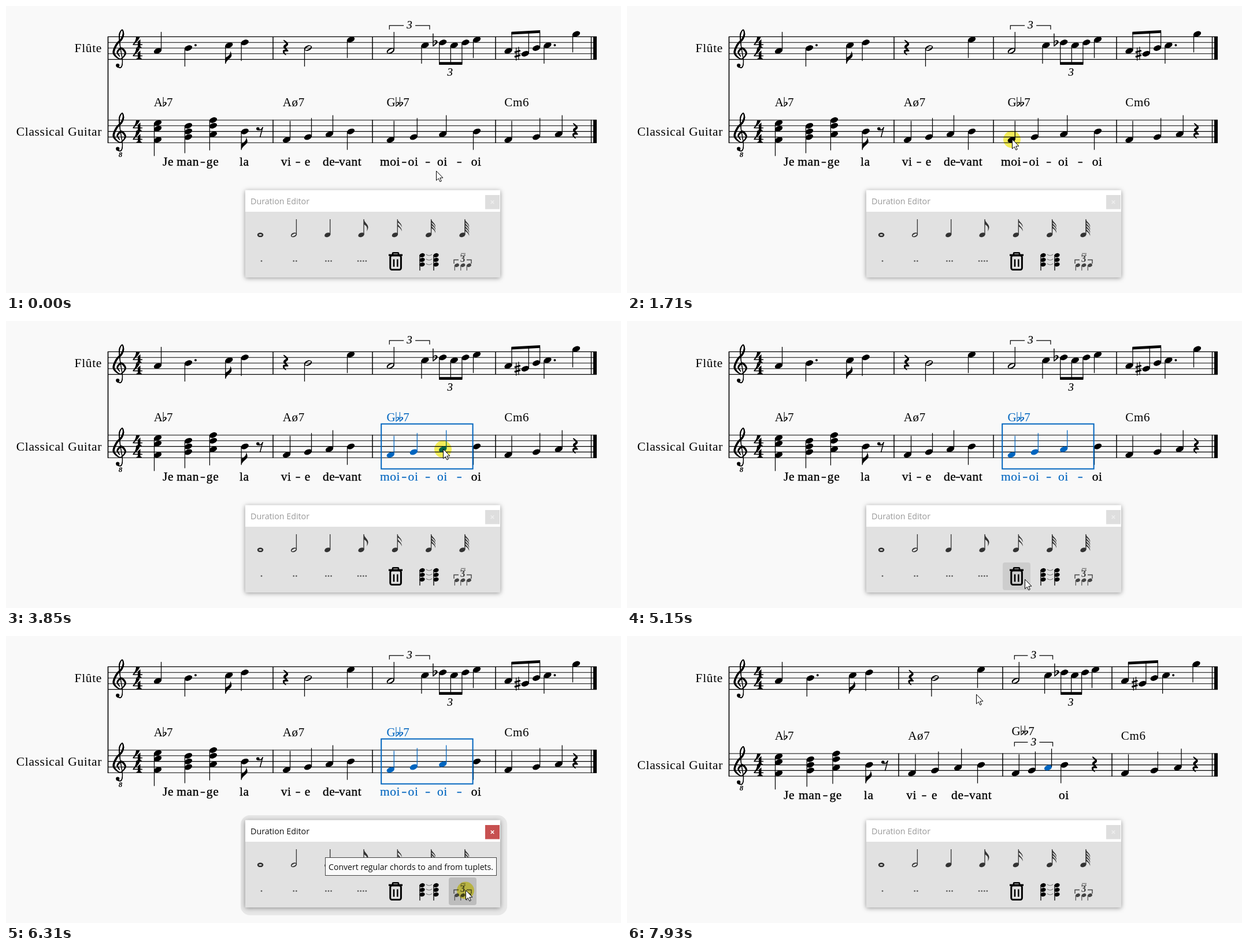
Animation of 1064x498 px, one loop 8 s. Source, as an HTML page with a canvas:

```html
<!DOCTYPE html>
<html lang="en">
<head>
<meta charset="utf-8">
<title>Duration Editor</title>
<style>
html, body { margin: 0; width: 100%; height: 100%; overflow: hidden; background: #f9f9f9; }
canvas { display: block; }
</style>
</head>
<body>
<canvas id="stage" width="1064" height="498"></canvas>
<script>
const ctx = document.getElementById('stage').getContext('2d');
const LOOP = 8000, SP = 9.8, BEAT = 12, INK = '#000', BLUE = '#0065bf', PAPER = '#f9f9f9';
const SERIF = '"Liberation Serif", serif', SANS = '"Open Sans", sans-serif';
const FLUTE_TOP = 53.4;

// Pitches high to low, length in twelfths of a beat, z = rest, ( ) = beam
const FLUTE = 'A12 B18 c6 d12|z12 B24 e12|A16 c8 (_d4 c4 d4) e12|(A6 ^G6 B6) c18 g12';
const GUITAR = 'Fce12 GBd12 Adf12 B6 z6|F12 G12 A12 B12|F12 G12 A12 B12|F12 G12 A12 z12';
const CONVERTED = GUITAR.replace('B12|F12 G12 A12 B12', 'B12|F8 G8 A8 B12 z12');
const VERSE = 'Je man- ge la|vi- e de- vant|';
const CHORDS = ['Ab7', 'Aø7', 'Gbb7', 'Cm6'];

function parse(source) {
  return source.split('|').map(bar => {
    let at = 0, beamed = false;
    return bar.split(' ').map(token => {
      const [, open, sign, keys, len, close] = token.match(/(\(?)([_^]?)([A-Ga-gz]+)(\d+)(\)?)/);
      beamed = beamed || !!open;
      const n = { at, sign, beamed, len: +len, rest: keys === 'z', steps: [...keys].map(k => 'gfedcBAGF'.indexOf(k) - 1) };
      at += n.len;
      if (close) beamed = false;
      return n;
    });
  });
}

// spans: x of the first and last column in each bar; wider beats grow with a power of their length
function layout(top, bars, spans, guitarSource, verse) {
  const flute = parse(FLUTE), guitar = parse(guitarSource);
  spans.forEach(([first, last], b) => {
    const notes = [...flute[b], ...guitar[b]];
    const times = [...new Set(notes.map(n => n.at))].sort((p, q) => p - q);
    const pad = b % 3 ? 0 : 10;
    const weight = i => ((times[i] - times[i - 1]) / BEAT) ** 0.65;
    const total = times.reduce((sum, _, i) => i ? sum + weight(i) : 0, 0);
    let x = first;
    times.forEach((at, i) => {
      if (i) x += weight(i) * (last - first - pad) / total + (i === 1 ? pad : 0);
      notes.filter(n => n.at === at).forEach(n => n.x = x);
    });
  });
  return { top, bars, flute, guitar, verse: verse.split('|').map(v => v.split(' ')) };
}
const BEFORE = layout(198, [462, 634, 847], [[262.5, 440.5], [485.5, 596.5], [665.3, 814.5], [869, 986.5]],
  GUITAR, VERSE + 'moi- oi- oi- oi');
const AFTER = layout(204, [470, 650, 839], [[262.5, 447.5], [493, 612.5], [672.3, 810.5], [861.5, 985]],
  CONVERTED, VERSE + '_ _ _ oi');

// Pointer moves: start, end, target x, target y
const MOVES = [
  [330, 1090, 672, 237], [1160, 1370, 666, 231], [2030, 2560, 769, 223], [2636, 2790, 756, 222],
  [4520, 5150, 688, 448], [5220, 5290, 779, 441], [5360, 5500, 810, 441], [5840, 6110, 795, 441],
  [7180, 7520, 668, 163], [7790, 7930, 604, 101]
];
const CLICKS = [[1710, 1830], [3850, 3920], [6310, 6450]];
const within = (t, a, b) => t >= a && t < b;

function pointer(t) {
  let x = 744, y = 286;
  for (const [a, b, tx, ty] of MOVES) {
    if (t < a) break;
    const gaps = Math.round((b - a) / 74);
    const p = Math.min(1, (Math.floor((t - a) / (b - a) * gaps + 1e-6) + 1) / (gaps + 1));
    const ease = p * p * (3 - 2 * p);
    x += (tx - x) * ease;
    y += (ty - y) * ease;
  }
  return { x: Math.round(x), y: Math.round(y) };
}

// ---- drawing helpers ----
function ink(color) { ctx.fillStyle = ctx.strokeStyle = color; }
function line(x1, y1, x2, y2, w) {
  ctx.lineWidth = w;
  ctx.beginPath(); ctx.moveTo(x1, y1); ctx.lineTo(x2, y2); ctx.stroke();
}
function dot(x, y, r) { ctx.beginPath(); ctx.arc(x, y, r, 0, 7); ctx.fill(); }
function oval(x, y, rx, ry, tilt) { ctx.beginPath(); ctx.ellipse(x, y, rx, ry, tilt, 0, 7); ctx.fill(); }
function box(x, y, w, h, r) { ctx.beginPath(); ctx.roundRect(x, y, w, h, r); }
function path(x, y, d, scale = 1) {
  ctx.save(); ctx.translate(x, y); ctx.scale(scale, scale); ctx.fill(new Path2D(d)); ctx.restore();
}
function text(s, x, y, font, o = {}) {
  ctx.font = font;
  ctx.textAlign = o.align || 'left';
  ctx.letterSpacing = (o.gap || 0) + 'px';
  ctx.fillText(s, x, y);
  if (o.bold) { ctx.lineWidth = o.bold; ctx.strokeText(s, x, y); }
  return ctx.measureText(s).width;
}

// Smooth brush stroke through [x, y, width] points
function brush(ox, oy, pts) {
  ctx.lineCap = 'round';
  const at = i => pts[Math.max(0, Math.min(pts.length - 1, i))];
  let last = pts[0];
  for (let s = 1; s <= (pts.length - 1) * 10; s++) {
    const i = Math.floor((s - 1) / 10), u = s / 10 - i;
    const p = [0, 1, 2].map(j => {
      const a = at(i - 1)[j], b = at(i)[j], c = at(i + 1)[j], d = at(i + 2)[j];
      return b + u / 2 * (c - a + u * (2 * a - 5 * b + 4 * c - d + u * (3 * (b - c) + d - a)));
    });
    line(ox + last[0], oy + last[1], ox + p[0], oy + p[1], Math.max(0.6, p[2]));
    last = p;
  }
  ctx.lineCap = 'butt';
}

// ---- music symbols ----
const CLEF = [[12.5, 4.6, 1.2], [8.8, -3, 2.5], [15.8, -9.4, 3.3], [22.4, -0.5, 2.8], [13.5, 9.2, 1.4],
  [2.4, -1, 3.2], [7, -15.5, 3.3], [15.5, -25, 3.2], [19, -34, 2.6], [17, -41.5, 1.4], [12.2, -33, 2],
  [13.4, -14, 1.5], [17.4, 12, 1.4], [15, 23.6, 1.5], [8, 22.5, 1.7]];
const FOUR = 'M5.5 0H12C10 6 5 10 2 12.5H8.5V8L13 4V12.5H16.5V14H13V16Q13 18 15.5 18V19H6V18Q8.5 18 8.5 16V14H0V12.5C4 8 5.5 4 5.5 0Z';
const FLAT = 'M-4-15.5H-2.6V-2.2C0-5 4.6-4.6 4.4-.8C4.2 2.4 0 4 -3 7H-4ZM-2.6-.4V4.6C-.4 2.6 1.6 .8 1.5-1.2C1.4-3.2-1.2-2.6-2.6-.4Z';
const FLAG = 'M0 0C1.2-8 11-10 10.6-16Q10.4-19 8.4-23C9-16 3.4-13 0-11.5Z';

const yOf = (top, step) => top + step * SP / 2;

function rest(n, top) {
  const x = n.x - 1.7, mid = yOf(top, 4);
  if (n.len < BEAT) {
    dot(x - 3, mid - 4.6, 2.8);
    brush(x, mid, [[-3, -3, 1.2], [2, -3, 1.3], [5.4, -7, 1.2]]);
    line(x + 5.2, mid - 7, x + 0.6, mid + 10.5, 1.6);
  } else {
    brush(x, mid, [[-3, -13.5, 1.4], [2.6, -7.2, 3], [-1.8, -2, 3.8], [3.8, 4.8, 1.5]]);
    brush(x, mid, [[3.8, 4.8, 1.5], [-2.4, 4.4, 2.8], [-3, 8, 2.2], [0.4, 11.8, 1]]);
  }
}
function sharp(x, y) {
  for (const side of [-1, 1]) {
    line(x + 2.1 * side, y - 11.3 - 0.7 * side, x + 2.1 * side, y + 11.3 - 0.7 * side, 1.2);
    line(x - 5, y + 1.5 + 3.9 * side, x + 5, y - 1.5 + 3.9 * side, 3);
  }
}
function heads(n, top) {
  const { x } = n;
  n.steps.forEach(step => {
    const y = yOf(top, step);
    ctx.beginPath();
    ctx.ellipse(x, y, 7, 4.4, -0.4, 0, 7);
    if (n.len === 16 || n.len === 24) {
      ctx.closePath(); ctx.moveTo(x + 4.7, y - 3); ctx.ellipse(x, y, 5.6, 2.2, -0.57, 0, 7);
    }
    ctx.fill('evenodd');
    if (n.sign === '_') path(x - 13.5, y, FLAT);
    if (n.sign === '^') sharp(x - 13.5, y);
    if (n.len === 18) dot(x + 12.5, yOf(top, step % 2 ? step : step - 1), 2);
  });
}
function stem(n, top, up, end) {
  const ys = n.steps.map(s => yOf(top, s)), x = n.x + (up ? 6 : -6);
  line(x, up ? Math.max(...ys) - 1.5 : Math.min(...ys) + 1, x, end, 1.25);
}
function single(n, top, tint) {
  const low = Math.max(...n.steps), high = Math.min(...n.steps), up = low + high > 8;
  const reach = n.steps.length > 1 ? 28 : 32;
  const end = up ? yOf(top, high) - reach - 1 : yOf(top, low) + reach;
  ink(tint ? BLUE : INK);
  heads(n, top);
  ink(tint === 'all' ? BLUE : INK);
  stem(n, top, up, end);
  if (n.len === 6) path(n.x - 6, end + 1, FLAG);
  ink(INK);
}
function beam(group, top) {
  const steps = group.map(n => n.steps[0]), first = group[0], last = group[group.length - 1];
  const up = steps.reduce((a, b) => a + b) > 4 * group.length;
  const y = up ? yOf(top, Math.min(...steps)) - 27.3 : yOf(top, Math.max(...steps)) + 31.5;
  const side = up ? 6 : -6, a = first.x + side, b = last.x + side;
  const tilt = Math.sign(last.steps[0] - first.steps[0]) * 1.4;
  group.forEach(n => { heads(n, top); stem(n, top, up, y); });
  ctx.beginPath();
  ctx.moveTo(a - 0.6, y - tilt - 2.4); ctx.lineTo(b + 0.6, y + tilt - 2.4);
  ctx.lineTo(b + 0.6, y + tilt + 2.4); ctx.lineTo(a - 0.6, y - tilt + 2.4);
  ctx.fill();
  if (first.len === 4) three((a + b) / 2 - 1, y + 21.5);
}
function bracket(a, b, y) {
  const mid = (a + b) / 2;
  ctx.lineWidth = 1.2;
  ctx.beginPath();
  ctx.moveTo(a, y + 7); ctx.lineTo(a, y); ctx.lineTo(mid - 10, y);
  ctx.moveTo(mid + 10, y); ctx.lineTo(b, y); ctx.lineTo(b, y + 7);
  ctx.stroke();
  three(mid, y + 5.5);
}
function three(x, y) { text('3', x, y, 'italic 19px ' + SERIF, { align: 'center', bold: 0.2 }); }

function staff(top, bars, label) {
  const end = top + 4 * SP + 0.5;
  for (let i = 0; i < 5; i++) line(176, top + i * SP, 1022, top + i * SP, 1.1);
  bars.forEach(x => line(x, top - 0.5, x, end, 1.5));
  line(1012.5, top - 0.5, 1012.5, end, 1.4);
  ctx.fillRect(1016, top - 0.5, 6, end - top + 0.5);
  brush(184, top + 3 * SP, CLEF);
  dot(193.2, top + 3 * SP + 20.3, 3.1);
  path(219.5, top + 0.3, FOUR);
  path(219.5, top + 2 * SP + 0.3, FOUR);
  text(label, 166, top + 27, '21.5px ' + SERIF, { align: 'right', gap: 0.64 });
}
function voice(bars, top, tint = () => '') {
  bars.forEach((bar, b) => {
    bar.forEach((n, i) => {
      if (n.rest) rest(n, top);
      else if (!n.beamed) single(n, top, tint(b, i));
    });
    const group = bar.filter(n => n.beamed);
    if (group.length) beam(group, top);
    const tuplet = bar.filter(n => !n.beamed && n.len % 4 === 0 && n.len % BEAT);
    if (tuplet.length) bracket(tuplet[0].x - 2, tuplet[tuplet.length - 1].x + 8, top - 19.6);
  });
}

function score(t) {
  const L = t < 6650 ? BEFORE : AFTER, after = L === AFTER, { top } = L;
  const picked = within(t, 3850, 6650);
  const tint = (b, i) => {
    if (b !== 2) return '';
    if (picked) return i < 3 ? 'all' : '';
    return after && i === 2 || within(t, 1770, 3850) && i === 0 ? 'head' : '';
  };
  line(176.5, FLUTE_TOP - 0.5, 176.5, top + 4 * SP + 0.5, 1.6);
  staff(FLUTE_TOP, L.bars, 'Flûte');
  voice(L.flute, FLUTE_TOP);
  staff(top, L.bars, 'Classical Guitar');
  text('8', 198, top + 63.5, 'italic bold 13px ' + SERIF, { align: 'center' });
  voice(L.guitar, top, tint);
  CHORDS.forEach((name, b) => {
    ink(picked && b === 2 ? BLUE : INK);
    chordName(name, L.guitar[b][0].x - 6.8, top - (after && b === 2 ? 32.5 : 24));
  });
  lyrics(L, tint);
  if (picked) {
    ink(BLUE);
    ctx.lineWidth = 2;
    ctx.strokeRect(649.2, 178.6, 158.4, 78);
  }
}

function chordName(name, x, y) {
  for (const c of name) {
    if (c === 'b') { path(x + 3, y - 4.5, FLAT, 0.75); x += 6.5; }
    else x += text(c, x, y, '21px ' + SERIF, { gap: 0.7 });
  }
}

// Syllables sit centred under their notes, hyphens halfway between them
function lyrics(L, tint) {
  const y = L.top + 79;
  let hyphenFrom = null;
  L.verse.forEach((words, b) => words.forEach((word, i) => {
    if (word === '_') return;
    const s = word.replace('-', ''), blue = tint(b, i) === 'all';
    const x = L.guitar[b][i].x + (s === 'Je' ? 18 : -0.8);
    ctx.font = '21.5px ' + SERIF;
    ctx.letterSpacing = '0.6px';
    const half = ctx.measureText(s).width / 2;
    if (hyphenFrom) {
      ink(hyphenFrom.blue ? BLUE : INK);
      ctx.fillRect((hyphenFrom.x + x - half) / 2 - 3.8, y - 6.6, 7.5, 1.8);
    }
    ink(blue ? BLUE : INK);
    text(s, x - half, y, ctx.font, { gap: 0.6, bold: blue ? 0.15 : 0.35 });
    hyphenFrom = word === s ? null : { x: x + half, blue };
  }));
}

// ---- tool window ----
function iconNote(x, flags) {
  oval(x, 397.2, 5.4, 3.7, -0.4);
  line(x + 4.4, 370, x + 4.4, 396, 1.3);
  if (flags === 1) path(x + 4.4, 370, 'M0 0C1 6 8.5 9 7.5 15Q7 18 5 21C7.5 13 3 10.5 0 9Z');
  for (let i = 0; flags > 1 && i < flags; i++)
    path(x + 4.4, 370 + i * (flags === 2 ? 7 : 5), 'M0 0C1 5 8 7 7.4 14C6 9 3 7 0 5.5Z');
}
function icons() {
  ink('#333');
  ctx.lineWidth = 2.6;
  ctx.beginPath(); ctx.ellipse(440, 397.2, 4, 2.6, 0, 0, 7); ctx.stroke();
  for (let i = 0; i < 6; i++) iconNote(498 + 58.3 * i, i - 1);
  ink('#e1e1e1');
  oval(498, 397.2, 4, 1.7, -0.5);
  ink('#555');
  for (let i = 0; i < 4; i++)
    for (let k = 0; k <= i; k++) dot(442 + 58 * i + (k - i / 2) * 4.6, 442.5, 1.35);
  trashIcon();
  tieIcon();
  tupletIcon();
}
function trashIcon() {
  ink(INK);
  line(662, 432.2, 686, 432.2, 3.2);
  ctx.lineWidth = 2.6;
  box(669, 428.3, 10, 4, 1); ctx.stroke();
  ctx.lineWidth = 3;
  box(664.8, 433, 18.6, 24.6, 3); ctx.stroke();
  for (const x of [671, 677.3]) line(x, 439.5, x, 452.5, 2.6);
}
function tieIcon() {
  for (const y of [432.5, 440.5, 448.5]) {
    ink(INK);
    for (const x of [720, 744]) oval(x, y, 4.7, 3.5, -0.3);
    ink('#777');
    ctx.lineWidth = 1.1;
    ctx.beginPath(); ctx.moveTo(727, y - 1.5); ctx.quadraticCurveTo(732, y + 2.5, 737, y - 1.5); ctx.stroke();
  }
  ink(INK);
  for (const x of [716, 740]) line(x, 432, x, 459, 1.3);
}
function tupletIcon() {
  ink('#444');
  text('3', 790, 444, 'bold 17px ' + SERIF, { align: 'center' });
  for (const side of [-1, 1]) {
    ctx.lineWidth = 1.4;
    ctx.beginPath();
    ctx.moveTo(790 + 15 * side, 447); ctx.lineTo(790 + 15 * side, 440.5); ctx.lineTo(790 + 7 * side, 440.5);
    ctx.stroke();
  }
  for (let x = 780; x < 802; x += 10.5) {
    oval(x, 449.8, 4, 2.9, -0.4);
    line(x - 3.7, 450, x - 3.7, 459, 1.1);
  }
  ink('#777');
  line(787, 429.5, 795, 429.5, 1.4);
  for (const x of [787.5, 793.5]) dot(x, 432.5, 1.4);
}

function panel(t, p) {
  const active = within(t, 6310, 6450);
  if (active) {
    ink('#e7e7e7');
    box(406, 311, 461, 173.5, 16); ctx.fill();
  }
  ctx.save();
  ctx.shadowColor = 'rgba(0,0,0,.42)';
  ctx.shadowBlur = 8;
  ctx.shadowOffsetY = 1;
  ink('#e1e1e1');
  ctx.fillRect(414, 319.5, 441, 151.5);
  ctx.restore();
  ink('#fff');
  ctx.fillRect(414, 319.5, 441, 37.5);
  ink(active ? '#111' : '#999');
  text('Duration Editor', 423, 344, '14.25px ' + SANS);
  ink(active ? '#c75050' : '#dedede');
  ctx.fillRect(829, 328, 25, 24.5);
  ink(active ? '#fff' : '#eee');
  line(838.8, 337.5, 844.2, 343, 1.5);
  line(844.2, 337.5, 838.8, 343, 1.5);

  const col = Math.floor((p.x - 418) / 58), row = Math.floor((p.y - 361) / 58);
  const hx = 418 + col * 58, hy = 361 + row * 58;
  if (within(col, 0, 7) && within(row, 0, 2) && p.x < hx + 48 && p.y < hy + 48) {
    ink(within(t, 6310, 6650) ? '#bdbdbd' : '#cdcdcd');
    box(hx, hy, 48, 48, 4); ctx.fill();
  }
  icons();
  if (within(t, 6310, 7180)) {
    ink('#fafafa');
    ctx.fillRect(552, 384, 297, 32);
    ink('#444');
    ctx.lineWidth = 1;
    ctx.strokeRect(552.5, 384.5, 296, 31);
    ink('#111');
    text('Convert regular chords to and from tuplets.', 558, 406, '14.1px ' + SANS);
  }
}

function arrow({ x, y }) {
  const shape = new Path2D('M.5 .3V16.7L4.3 13.3L6.9 18.9L9.3 17.8L6.8 12.3L11.9 12.1Z');
  ctx.save();
  ctx.translate(x, y);
  ctx.fillStyle = '#fff';
  ctx.fill(shape);
  ctx.strokeStyle = INK;
  ctx.lineWidth = 1;
  ctx.stroke(shape);
  ctx.restore();
}

function draw(t) {
  const p = pointer(t);
  ink(PAPER);
  ctx.fillRect(0, 0, 1064, 498);
  ink(INK);
  score(t);
  panel(t, p);
  if (CLICKS.some(([a, b]) => within(t, a, b))) {
    ctx.globalCompositeOperation = 'multiply';
    ink('#f8f25a');
    dot(p.x, p.y + 0.5, 15);
    ctx.globalCompositeOperation = 'source-over';
  }
  arrow(p);
}

const start = performance.now();
function tick() {
  draw((performance.now() - start) % LOOP);
  requestAnimationFrame(tick);
}
tick();
</script>
</body>
</html>
```
